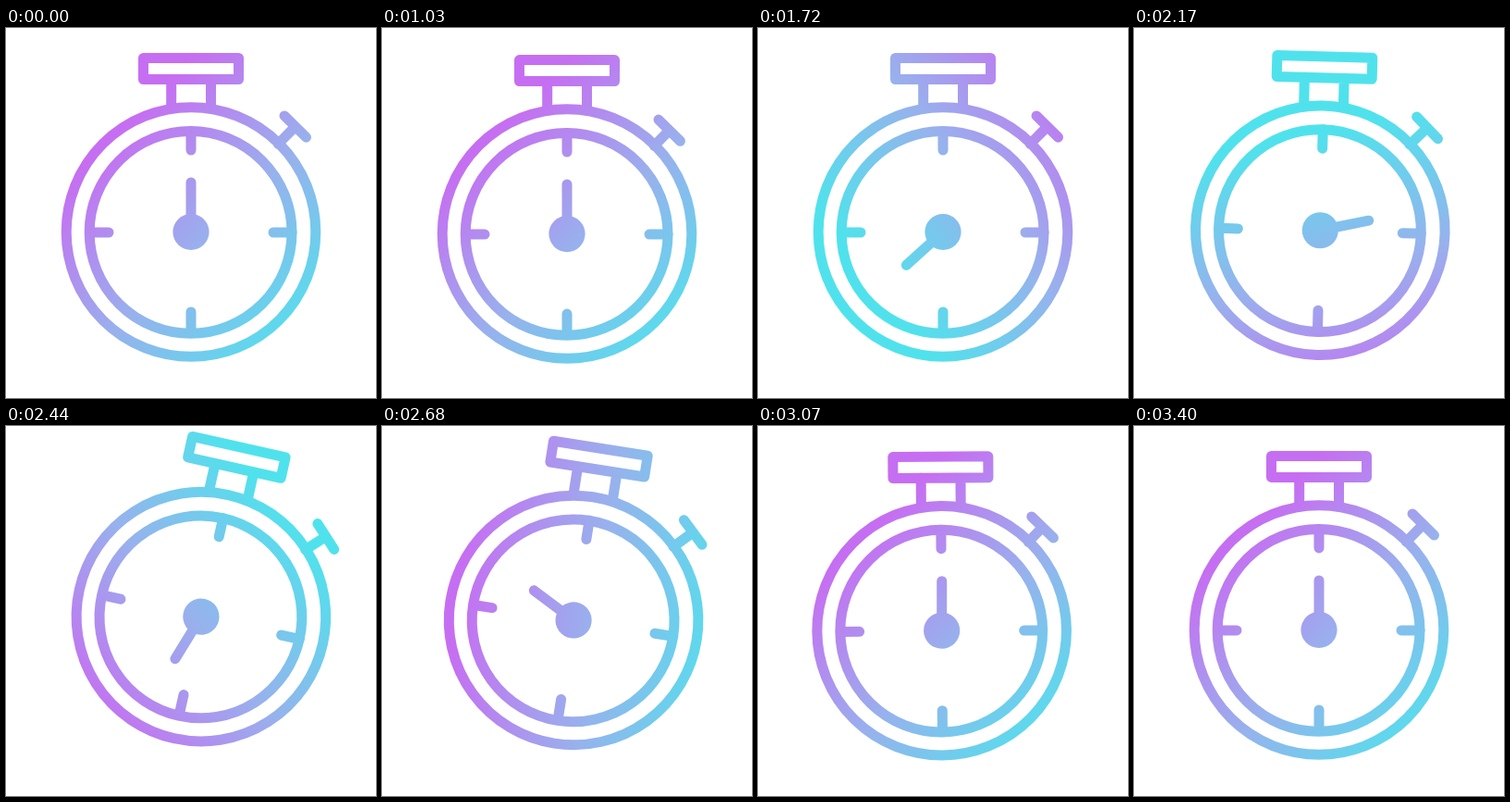
Recreate the animation shown at these times as an HTML page. Size 400 by 400 pixels, loop 3430 ms.

```html
<!DOCTYPE html>
<html lang="en">
<head>
<meta charset="utf-8">
<title>Stopwatch</title>
<style>
  html, body { margin: 0; width: 100%; height: 100%; overflow: hidden; background: #fff; }
  svg { display: block; width: 100%; height: 100%; }
</style>
</head>
<body>
<svg viewBox="0 0 400 400">
  <defs>
    <linearGradient id="tint" gradientUnits="userSpaceOnUse">
      <stop offset="0" stop-color="#c66ef1"/>
      <stop offset=".5" stop-color="#98b1ed"/>
      <stop offset="1" stop-color="#50e2ec"/>
    </linearGradient>
    <mask id="shape" maskUnits="userSpaceOnUse" x="0" y="0" width="400" height="400">
      <g id="watch" fill="none" stroke="#fff" stroke-width="11" stroke-linecap="round" stroke-linejoin="round">
        <circle r="134.8"/>
        <circle cx="-.4" cy=".4" r="109.4"/>
        <path d="M0-109V-88.5M0 109V86.5M-109 .5H-89M109 .5H89"/>
        <path d="M-51.5-188H51.5V-165H-51.5ZM-21.3-165V-134M21.5-165V-134"/>
        <path id="button" transform="rotate(44.7)"/>
        <path id="needle" d="M0 0V-53.5"/>
        <circle r="19.6" fill="#fff" stroke="none"/>
      </g>
    </mask>
  </defs>
  <rect width="400" height="400" fill="url(#tint)" mask="url(#shape)"/>
</svg>
<script>
const LOOP = 3430, HOLD = 1030, STEP = 30;
const el = id => document.getElementById(id);
const [watch, button, needle, tint] = ['watch', 'button', 'needle', 'tint'].map(el);

const part = (t, from, to) => Math.min(1, Math.max(0, (t - from) / (to - from)));
const smooth = u => u * u * (3 - 2 * u);
const ramp = (t, from, to) => smooth(part(t, from, to));

// Rises over a-b, holds, falls over c-d past zero by `back`, then settles
const swing = (t, a, b, c, d, back = 0) =>
  ramp(t, a, b) - (1 + back) * ramp(t, c, d) + back * ramp(t, d, 2 * d - c);

const lift = (t, back) => swing(t, 2090, 2460, 2570, 2890, back);
const dip = t => swing(t, 1000, 1120, 1120, 1290, 0.31) + swing(t, 2690, 2900, 2900, 3160, 0.31);
const press = t => swing(t, 1000, 1120, 1120, 1300) + swing(t, 2680, 2850, 2890, 3150);

// Two turns at nearly even speed, with a small overshoot
function needleAngle(t) {
  const u = part(t, 1160, 2850);
  return 720 * (0.8 * u + 0.2 * smooth(u)) + 11 * swing(t, 2770, 2870, 2870, 3100);
}

function setTint(degrees) {
  const a = degrees * Math.PI / 180, length = 300;
  const place = (n, k) => {
    tint.setAttribute('x' + n, 250 + Math.sin(a) * length * k);
    tint.setAttribute('y' + n, 230 - Math.cos(a) * length * k);
  };
  place(1, -0.58);
  place(2, 0.42);
}

function draw(ms) {
  const t = ms < HOLD ? 0 : HOLD + Math.floor((ms - HOLD) / STEP) * STEP;
  const x = 200 + 11 * lift(t, 0.3);
  const y = 220.5 + 13 * dip(t) - 14.5 * lift(t);
  const tilt = 12.7 * lift(t, 0.08);
  const cap = 160.3 - 18.8 * press(t);
  watch.setAttribute('transform', `translate(${x} ${y}) rotate(${tilt})`);
  needle.setAttribute('transform', `rotate(${needleAngle(t)})`);
  button.setAttribute('d', `M-16.5 ${-cap}H16.5M0 ${-cap}V-134`);
  setTint(135 + 360 * ramp(t, 1000, 3100));
}

const start = performance.now();
function tick() {
  draw((performance.now() - start) % LOOP);
  requestAnimationFrame(tick);
}
tick();
</script>
</body>
</html>
```
